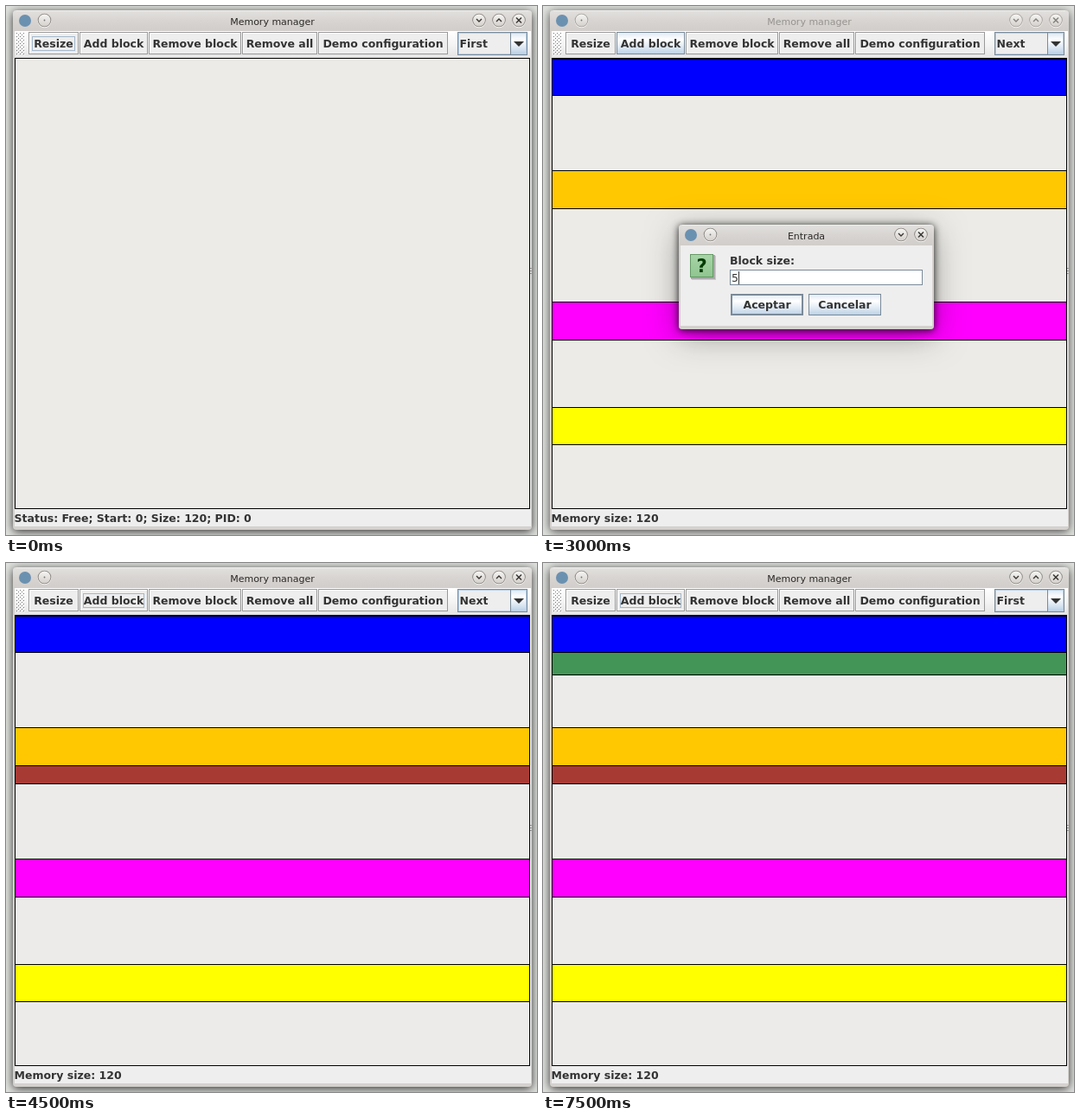
Animation of 614x612 px, one loop 9000 ms. Source, as an HTML page with a canvas:

```html
<!DOCTYPE html>
<html lang="en">
<head>
<meta charset="utf-8">
<title>Memory manager</title>
<style>
  html, body { margin: 0; width: 100%; height: 100%; overflow: hidden; }
  canvas { display: block; }
</style>
</head>
<body>
<canvas id="stage" width="614" height="612"></canvas>
<script>
const ctx = document.getElementById('stage').getContext('2d');
const BOLD = 'bold 12.5px "DejaVu Sans", sans-serif';
const PLAIN = '12.5px "DejaVu Sans", sans-serif';
const TITLE = '11px "DejaVu Sans", sans-serif';
const INK = '#333', BORDER = '#7a8a99';
const OCEAN = ['#dde8f3', '#fff', '#dfe9f3', '#b8cfe5'];

const MEMORY = 120, STEP = 1500;
const demo = [[0, 10, '#00f'], [30, 10, '#ffc800'], [65, 10, '#f0f'], [93, 10, '#ff0']];
const withRed = [...demo, [40, 5, '#a83a34']];
const withGreen = [...withRed, [10, 6, '#439557']];
const total = 'Memory size: 120';
const steps = [
  { blocks: [], fit: 'First', focus: 'Resize', status: 'Status: Free; Start: 0; Size: 120; PID: 0' },
  { blocks: demo, fit: 'First', focus: 'Demo configuration', status: 'Status: Free; Start: 40; Size: 25; PID: 0' },
  { blocks: demo, fit: 'Next', input: '5', status: total },
  { blocks: withRed, fit: 'Next', focus: 'Add block', status: total },
  { blocks: withRed, fit: 'First', input: '6', status: total },
  { blocks: withGreen, fit: 'First', focus: 'Add block', status: total }
];
const toolbar = [['Resize', 26, 58], ['Add block', 85, 79], ['Remove block', 165, 107],
  ['Remove all', 273, 87], ['Demo configuration', 361, 150]];

function rect(x, y, w, h, fill) {
  ctx.fillStyle = fill;
  ctx.fillRect(x, y, w, h);
}

function frame(x, y, w, h, color) {
  ctx.lineWidth = 1;
  ctx.strokeStyle = color;
  ctx.strokeRect(x + .5, y + .5, w - 1, h - 1);
}

function text(str, x, y, font = BOLD, color = INK, align = 'left') {
  ctx.font = font;
  ctx.fillStyle = color;
  ctx.textAlign = align;
  ctx.fillText(str, x, y);
}

function shade(y, h, colors) {
  const g = ctx.createLinearGradient(0, y, 0, y + h);
  colors.forEach((c, i) => g.addColorStop(i / (colors.length - 1), c));
  return g;
}

function path(points, color, width) {
  ctx.beginPath();
  points.forEach(([x, y]) => ctx.lineTo(x, y));
  ctx.strokeStyle = color;
  ctx.lineWidth = width;
  ctx.stroke();
}

function disc(x, y, r, fill) {
  ctx.beginPath();
  ctx.arc(x, y, r, 0, 7);
  ctx.fillStyle = fill;
  ctx.fill();
}

function roundButton(x, y, kind, active) {
  const ink = active ? '#373431' : '#85817e';
  disc(x, y + .8, 8, '#f3f2f0');
  disc(x, y, 7.8, active ? '#85817d' : '#a19d99');
  disc(x, y, 6.9, shade(y - 7, 14, ['#f6f5f3', '#d4d0cc']));
  if (kind === 'dot') disc(x, y, .9, '#777');
  if (kind === 'down') path([[x - 3, y - 1.5], [x, y + 1.5], [x + 3, y - 1.5]], ink, 1.4);
  if (kind === 'up') path([[x - 3, y + 1.5], [x, y - 1.5], [x + 3, y + 1.5]], ink, 1.4);
  if (kind === 'close') {
    path([[x - 3, y - 3], [x + 3, y + 3]], ink, 1.5);
    path([[x - 3, y + 3], [x + 3, y - 3]], ink, 1.5);
  }
}

function windowFrame(x, y, w, h, title, controls, active, shadow) {
  ctx.save();
  ctx.shadowColor = shadow.color;
  ctx.shadowBlur = shadow.blur;
  ctx.shadowOffsetY = shadow.drop;
  ctx.beginPath();
  ctx.roundRect(x, y, w, h, 4);
  ctx.fillStyle = '#d4d1ce';
  ctx.fill();
  ctx.restore();
  ctx.fillStyle = shade(y, 24, ['#e3e1df', '#d7d4d1', '#d0cdca']);
  ctx.beginPath();
  ctx.roundRect(x, y, w, 24, [4, 4, 0, 0]);
  ctx.fill();
  rect(x + 4, y, w - 8, 1, '#efeeec');
  const cy = y + 11.5;
  disc(x + 14, cy + .5, 7, '#6b91b0');
  roundButton(x + 36.5, cy, 'dot', active);
  controls.forEach((kind, i) =>
    roundButton(x + w - 15 - 23 * (controls.length - 1 - i), cy, kind, active));
  text(title, x + w / 2, y + 16.5, TITLE, active ? '#2b2927' : '#96938f', 'center');
}

function drawToolbar(step) {
  rect(10, 29, 597, 31, shade(29, 31, ['#fff', '#f4f4f4', '#e4e4e4']));
  for (let y = 31; y < 56; y += 2)
    for (let x = 12 + (y % 4 === 1 ? 2 : 0); x < 22; x += 4) {
      rect(x, y, 1, 1, '#777');
      rect(x + 1, y + 1, 1, 1, '#fff');
    }
  for (const [label, x, w] of toolbar) {
    const hot = step.input && label === 'Add block';
    rect(x, 30, w, 26, hot ? shade(30, 26, OCEAN) : '#eee');
    frame(x, 30, w, 26, hot ? BORDER : '#999');
    if (!hot) {
      rect(x + 1, 31, w - 2, 1, '#fff');
      rect(x + 1, 31, 1, 24, '#fff');
    }
    if (step.focus === label) frame(x + 4, 35, w - 8, 17, '#a3b8cc');
    text(label, x + w / 2, 48, BOLD, INK, 'center');
  }
  rect(522, 30, 81, 27, '#eee');
  rect(583, 31, 19, 25, shade(31, 25, OCEAN));
  frame(523, 31, 79, 25, '#b8cfe5');
  frame(522, 30, 81, 27, BORDER);
  rect(583, 31, 1, 25, BORDER);
  text(step.fit, 524.5, 48);
  ctx.fillStyle = INK;
  ctx.beginPath();
  ctx.moveTo(587, 41);
  ctx.lineTo(599, 41);
  ctx.lineTo(593, 47);
  ctx.fill();
}

function drawMemory(step) {
  const at = n => Math.round(60 + n * 521 / MEMORY);
  rect(10, 60, 596, 522, step.blocks.length && !step.input ? '#ecebea' : '#ecebe7');
  for (const [start, size, color] of step.blocks) {
    const top = Math.max(61, at(start)), bottom = at(start + size);
    rect(10, top, 596, bottom - top + 1, color);
    frame(10, top, 596, bottom - top + 1, '#000');
  }
  frame(10, 60, 596, 522, '#000');
}

function dialogButton(label, x, isDefault) {
  rect(x, 333, 84, 25, shade(333, 25, OCEAN));
  frame(x, 333, 84, 25, BORDER);
  if (isDefault) frame(x + 1, 334, 82, 23, BORDER);
  text(label, x + 42, 350, BOLD, INK, 'center');
}

function drawDialog(value) {
  windowFrame(157, 253, 295, 121, 'Entrada', ['down', 'close'], true,
    { color: 'rgba(0,0,0,.35)', blur: 36, drop: 8 });
  windowFrame(157, 253, 295, 121, 'Entrada', ['down', 'close'], true,
    { color: 'rgba(0,0,0,.85)', blur: 9, drop: 1 });
  rect(159, 277, 291, 93, '#eee');
  rect(172, 289, 28, 28, '#ccc');
  rect(171, 288, 28, 28, '#aaa');
  rect(170, 287, 27, 27, shade(287, 27, ['#a8d5a8', '#8fc48f']));
  frame(170, 287, 27, 27, '#669966');
  text('?', 183.5, 308, 'bold 21px "DejaVu Sans", sans-serif', '#003c00', 'center');
  text('Block size:', 216, 299);
  rect(216, 305, 223, 18, '#fff');
  frame(216, 305, 223, 18, BORDER);
  text(value, 218, 319, PLAIN);
  rect(226, 307, 1, 15, INK);
  dialogButton('Aceptar', 217, true);
  dialogButton('Cancelar', 307, false);
}

function draw(step) {
  rect(0, 0, 614, 612, '#e0e2de');
  windowFrame(8, 5, 600, 601, 'Memory manager', ['down', 'up', 'close'], !step.input,
    { color: step.input ? 'rgba(0,0,0,.7)' : 'rgba(0,0,0,.8)', blur: 11, drop: 2 });
  rect(10, 29, 597, 573, '#eee');
  drawToolbar(step);
  drawMemory(step);
  for (let y = 303; y < 311; y += 3) rect(606, y, 2, 1, '#999');
  text(step.status, 9.5, 597);
  if (step.input) drawDialog(step.input);
}

function tick() {
  draw(steps[Math.floor(performance.now() / STEP) % steps.length]);
  requestAnimationFrame(tick);
}
tick();
</script>
</body>
</html>
```
